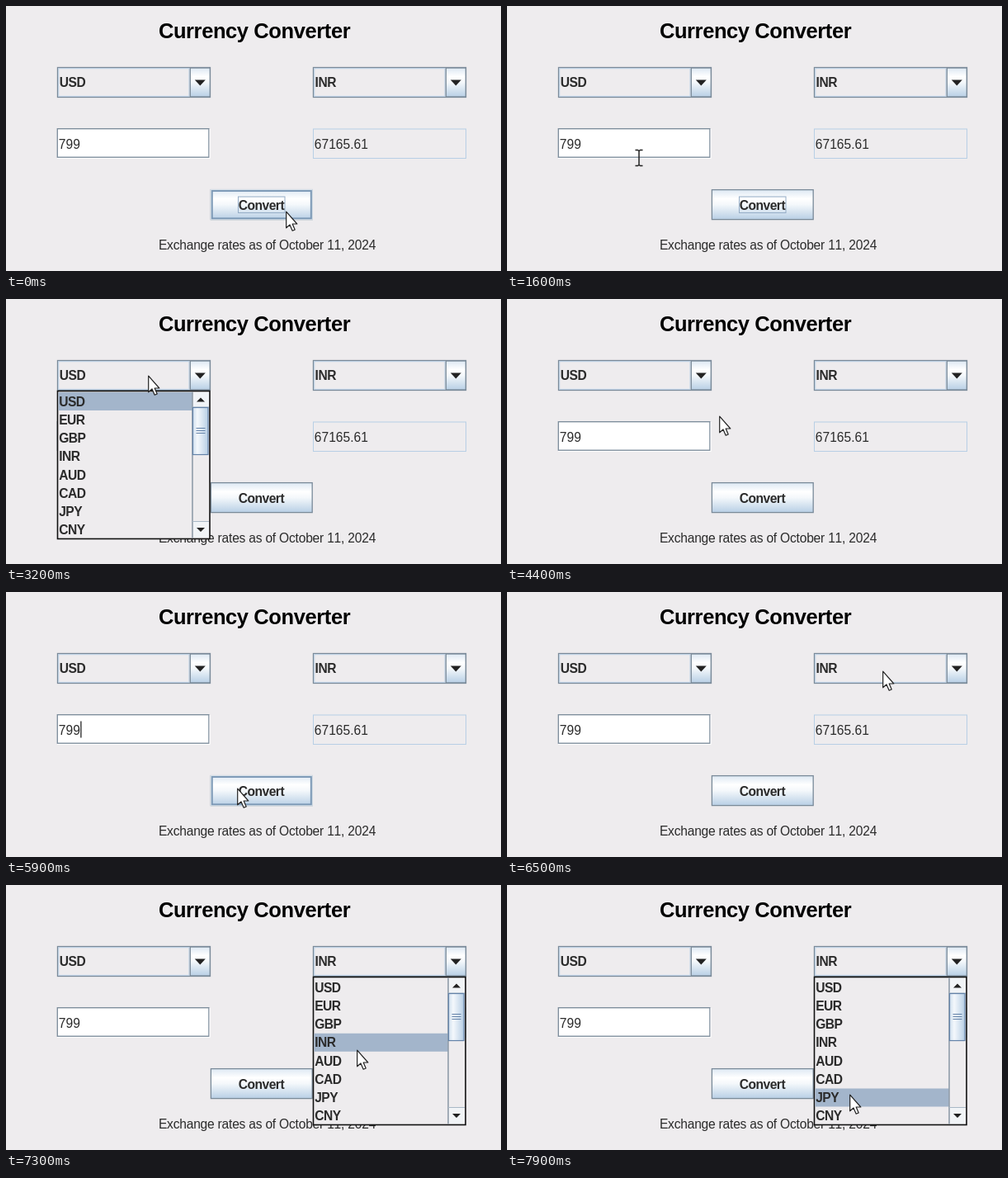
An HTML page for the animation above (8000 ms loop, 600 by 321 pixels).

```html
<!DOCTYPE html>
<html lang="en">
<head>
<meta charset="utf-8">
<title>Currency Converter</title>
<style>
  html, body { margin: 0; width: 100%; height: 100%; overflow: hidden; background: #eeecee; }
  svg { display: block; width: 600px; height: 321px; }
  text { font: 15.6px "Liberation Sans", Arial, sans-serif; font-kerning: none; fill: #2b2b2b; }
  .bold text, text.bold { font-weight: bold; letter-spacing: -.5px; }
  text.note { letter-spacing: -.22px; }
  text.title { font-size: 25.5px; font-weight: bold; letter-spacing: -.4px; fill: #000; }
  .edge { stroke: #7a8a99; stroke-width: 1.3; }
  .soft { fill: none; stroke: #b8cfe5; }
  .steel { fill: url(#steel); }
  .row { fill: #a3b5cb; }

  /* Every state changes in hard steps on one 8 s clock. */
  .anim { animation: 8s step-end infinite; }
  #cursor { animation-name: move; }
  #arrow { animation-name: arrow; }
  #beam { animation-name: beam; }
  #caret { animation-name: caret; }
  #hover { animation-name: hover; }
  #focus { animation-name: focus; }
  #from { animation-name: from; }
  #to { animation-name: to; }
  #pick { animation-name: pick; }

  @keyframes move {
    0% { transform: translate(340px, 249px); }
    10% { transform: translate(318px, 232px); }
    11.25% { transform: translate(250px, 200px); }
    12.5% { transform: translate(190px, 172px); }
    20% { transform: translate(160px, 184px); }
    21.25% { transform: translate(163px, 175px); }
    30% { transform: translate(168px, 128px); }
    31.25% { transform: translate(173px, 93px); }
    43.75% { transform: translate(176px, 119px); }
    46.25% { transform: translate(184px, 118px); }
    47.5% { transform: translate(204px, 122px); }
    48.75% { transform: translate(222px, 128px); }
    53.75% { transform: translate(246px, 137px); }
    55% { transform: translate(258px, 142px); }
    60% { transform: translate(200px, 158px); }
    61.25% { transform: translate(165px, 168px); }
    68.75% { transform: translate(228px, 202px); }
    73.75% { transform: translate(281px, 238px); }
    75% { transform: translate(350px, 190px); }
    76.25% { transform: translate(430px, 130px); }
    78.75% { transform: translate(456px, 96px); }
    85% { transform: translate(454px, 104px); }
    86.25% { transform: translate(447px, 125px); }
    87.5% { transform: translate(437px, 149px); }
    88.75% { transform: translate(434px, 164px); }
    90% { transform: translate(430px, 182px); }
    91.25% { transform: translate(426px, 200px); }
    92.5% { transform: translate(422px, 217px); }
    93.75% { transform: translate(418px, 236px); }
    98.75%, 100% { transform: translate(416px, 254px); }
  }
  @keyframes arrow {
    0%, 30%, 68.75%, 100% { opacity: 1; }
    12.5%, 60% { opacity: 0; }
  }
  @keyframes beam {
    0%, 30%, 68.75%, 100% { opacity: 0; }
    12.5%, 60% { opacity: 1; }
  }
  @keyframes caret {
    0%, 26.25%, 40%, 67.5%, 81.25%, 100% { opacity: 0; }
    21.25%, 33.75%, 61.25%, 73.75% { opacity: 1; }
  }
  @keyframes hover {
    0%, 73.75% { opacity: 1; }
    11.25%, 75%, 100% { opacity: 0; }
  }
  @keyframes focus {
    0% { opacity: 1; }
    21.25%, 100% { opacity: 0; }
  }
  @keyframes from {
    0%, 46.25%, 100% { opacity: 0; }
    40% { opacity: 1; }
  }
  @keyframes to {
    0% { opacity: 0; }
    83.75%, 100% { opacity: 1; }
  }
  @keyframes pick {
    0%, 90% { transform: translateY(66.75px); }
    86.25% { transform: translateY(0); }
    87.5% { transform: translateY(22.25px); }
    88.75% { transform: translateY(44.5px); }
    92.5% { transform: translateY(89px); }
    93.75% { transform: translateY(111.25px); }
    98.75%, 100% { transform: translateY(133.5px); }
  }
</style>
</head>
<body>
<svg viewBox="0 0 600 321">
  <defs>
    <linearGradient id="steel" x2="0" y2="1">
      <stop offset="0" stop-color="#dde8f3"/>
      <stop offset=".3" stop-color="#fff"/>
      <stop offset=".5" stop-color="#f4f8fb"/>
      <stop offset="1" stop-color="#b8cfe5"/>
    </linearGradient>
    <linearGradient id="thumb">
      <stop offset="0" stop-color="#cfdfee"/>
      <stop offset=".3" stop-color="#f4f8fc"/>
      <stop offset="1" stop-color="#b8cfe5"/>
    </linearGradient>

    <g id="combo">
      <rect class="edge" x="62.5" y="74.5" width="185" height="36" fill="#eeecee"/>
      <rect class="soft" x="63.7" y="75.7" width="158.3" height="33.6"/>
      <rect class="edge steel" x="223.3" y="75" width="24" height="35"/>
      <path d="M228.8 89.5H241.8L235.3 96.6Z" fill="#222"/>
    </g>

    <g id="frame">
      <rect x="62.5" y="111.5" width="184.5" height="179" fill="#eeecee" stroke="#111" stroke-width="1.6"/>
    </g>

    <g id="list" class="bold">
      <text x="64.2" y="129.6">USD</text>
      <text x="64.2" y="151.8">EUR</text>
      <text x="64.2" y="174.1">GBP</text>
      <text x="64.2" y="196.3">INR</text>
      <text x="64.2" y="218.6">AUD</text>
      <text x="64.2" y="240.8">CAD</text>
      <text x="64.2" y="263.1">JPY</text>
      <text x="64.2" y="285.3">CNY</text>
      <path d="M226 112.5V289.5" class="edge"/>
      <rect x="227" y="113" width="19" height="18" fill="#f1f4f7"/>
      <rect x="227" y="270" width="19" height="19" fill="#f1f4f7"/>
      <path d="M226 131H246M226 269.5H246" stroke="#a9b8c6"/>
      <path d="M231 124.5H241L236 119.5ZM231 277H241L236 282Z" fill="#222"/>
      <rect x="226.5" y="131.5" width="18.5" height="57" fill="url(#thumb)" stroke="#6382a8" stroke-width="1.2"/>
      <path d="M230.5 156.5H241.5M230.5 159.5H241.5M230.5 162.5H241.5" stroke="#6382a8"/>
    </g>
  </defs>

  <rect width="600" height="321" fill="#eeecee"/>
  <text class="title" x="184.9" y="39.2">Currency Converter</text>

  <use href="#combo"/>
  <use href="#combo" x="310"/>
  <text class="bold" x="64.8" y="97.7">USD</text>
  <text class="bold" x="374.6" y="97.7">INR</text>

  <rect class="edge" x="62.3" y="148.7" width="183.6" height="34.5" fill="#fff"/>
  <path d="M247.2 149V184.5H62" fill="none" stroke="#fff"/>
  <text x="63.8" y="172.8">799</text>
  <path id="caret" class="anim" d="M90.9 156.4V176.4" stroke="#222" stroke-width="1.3"/>
  <rect class="soft" x="372.5" y="149" width="185" height="35.5"/>
  <text x="373.8" y="172.8">67165.61</text>

  <rect class="edge steel" x="248.4" y="222.6" width="122.8" height="36"/>
  <g id="hover" class="anim">
    <rect x="248.4" y="222.6" width="122.8" height="36" fill="none" stroke="#d5dfe8" stroke-width="1.4"/>
    <rect x="249.8" y="224" width="120" height="33.3" fill="none" stroke="#7c99b6" stroke-width="1.9"/>
  </g>
  <rect id="focus" class="anim" x="281.5" y="231" width="56.5" height="19.5" fill="none" stroke="#94acc6"/>
  <text class="bold" x="281.7" y="246.9">Convert</text>

  <text class="note" x="184.9" y="295.2">Exchange rates as of October 11, 2024</text>

  <g id="from" class="anim">
    <use href="#frame"/>
    <rect class="row" x="63.5" y="113" width="162" height="22"/>
    <use href="#list"/>
  </g>

  <g transform="translate(310)">
    <g id="to" class="anim">
      <use href="#frame"/>
      <rect id="pick" class="anim row" x="63.5" y="113" width="162" height="22"/>
      <use href="#list"/>
    </g>
  </g>

  <g id="cursor" class="anim">
    <path id="arrow" class="anim" d="M-.3 .2V19.8L4 16L7.2 23.2L10.2 22L7.2 15H12.8Z" fill="#fff" stroke="#222" stroke-width="1.2" stroke-linejoin="round"/>
    <path id="beam" class="anim" d="M-4.5 -9.5H-1.5L0 -8.5L1.5 -9.5H4.5M0 -8.5V8.5M-4.5 9.5H-1.5L0 8.5L1.5 9.5H4.5" fill="none" stroke="#222" stroke-width="1.5"/>
  </g>
</svg>
</body>
</html>
```
